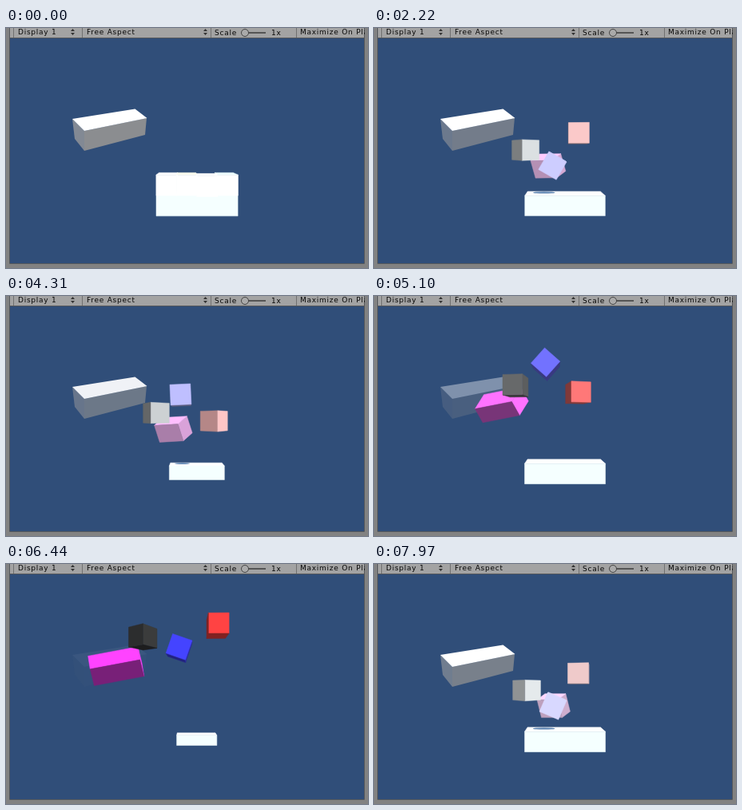
An HTML page with a canvas that plays this animation: 453 by 301 pixels, repeating every 8 s.

```html
<!DOCTYPE html>
<html>
<head>
<meta charset="utf-8">
<style>
html, body { margin: 0; width: 100%; height: 100%; overflow: hidden; background: #304e79; }
canvas, svg { position: absolute; left: 0; top: 0; }
text { font: 9px "DejaVu Sans", sans-serif; letter-spacing: .75px; fill: #080808; }
</style>
</head>
<body>
<canvas width="453" height="301"></canvas>
<svg width="453" height="301">
  <path d="M0 0H453V301H0ZM5 13V295H448V13Z" fill="#828282" fill-rule="evenodd"/>
  <rect x="4" width="445" height="12" fill="#a3a3a3"/>
  <path d="M4.500 0V295.500H448.500V0M4 12.500H449" fill="none" stroke="#55585c"/>
  <path d="M9.500 0V12M95.500 0V12M256.500 0V12M363.500 0V12" stroke="#707070"/>
  <path d="M81 4l2.500-3 2.500 3zM81 6l2.500 3 2.500-3zM247 4l2.500-3 2.500 3zM247 6l2.500 3 2.500-3z" fill="#333"/>
  <path d="M298 6H325" stroke="#555" stroke-width="2"/>
  <circle cx="299" cy="6" r="4.500" fill="#aaa" stroke="#444"/>
  <text x="15" y="8">Display 1</text>
  <text x="101" y="8">Free Aspect</text>
  <text x="261" y="9">Scale</text>
  <text x="332" y="9">1x</text>
  <svg width="449" height="12"><text x="368" y="8">Maximize On Play</text></svg>
</svg>
<script>
const ctx = document.querySelector('canvas').getContext('2d');
const LOOP = 8000, HOLD = 320, CYCLE = 5630;
const EYE = 245, VX = 226, VY = 154, UNIT = 24.5;

// Each face: corners (bits: 1 = right, 2 = bottom, 4 = back) and normal
const FACES = {
  back: [[5, 4, 6, 7], [0, 0, 1]], bottom: [[2, 3, 7, 6], [0, 1, 0]],
  left: [[4, 0, 2, 6], [-1, 0, 0]], right: [[1, 5, 7, 3], [1, 0, 0]],
  top: [[4, 5, 1, 0], [0, -1, 0]], front: [[0, 1, 3, 2], [0, 0, -1]]
};

// Each cube runs along a curve and back: start, bend, end, time of its peak, turn in degrees
const GRAY = { path: [[202, 195], [184, 134.5], [166, 74]], peak: 6010, turn: -145, axis: 'y' };
const BLUE = { path: [[226, 195], [219.5, 135], [213, 63]], peak: 5570, turn: 158, axis: 'z' };
const RED = { path: [[275, 195], [240, 122], [266, 75]], peak: 6350, turn: 185, axis: 'y' };

// Right, down and forward edges of the pink box, at even steps of its way
const POSES = [
  [26, 0, 0, 26, 1, 3], [26, 0, 6, 22, -11, 8],
  [45, -9, 10, 17, -12, 18], [77, -14, 1, 24, 15, 15]];

const clamp = v => Math.max(0, Math.min(1, v));
const mix = (a, b, s) => a + (b - a) * s;
const smooth = s => s * s * (3 - 2 * s);
const rgb = (c, k = 1) => `rgb(${c.map(v => Math.round(255 * clamp(v * k)))})`;

// Linear ping-pong, 1 at the peak
function pingPong(t, peak) {
  if (t < HOLD) return 0;
  const d = (t - peak + 2 * CYCLE) % CYCLE;
  return Math.abs(1 - 2 * d / CYCLE);
}

const curve = ([a, b, c], s) =>
  a.map((v, i) => mix(mix(v, b[i], s), mix(b[i], c[i], s), s));

function poly(points, fill, edge) {
  ctx.beginPath();
  points.forEach(p => ctx.lineTo(p[0], p[1]));
  ctx.closePath();
  ctx.fillStyle = ctx.strokeStyle = fill;
  ctx.fill();
  if (edge) ctx.stroke();
}

function solid(corner, paint) {
  ctx.lineWidth = .5;
  const p = [...Array(8).keys()].map(i =>
    corner(i & 1 ? .5 : -.5, i & 2 ? .5 : -.5, i & 4 ? .5 : -.5));
  for (const name in FACES) {
    const [a, b, c, d] = FACES[name][0].map(i => p[i]);
    const area = (c[0] - a[0]) * (d[1] - b[1]) - (c[1] - a[1]) * (d[0] - b[0]);
    if (area > 0) poly([a, b, c, d], paint(name), true);
  }
}

function project(x, y, z) {
  const k = EYE / (EYE + z);
  return [VX + (x - VX) * k, VY + (y - VY) * k];
}

function cube(item, t, color) {
  const s = pingPong(t, item.peak), [x, y] = curve(item.path, s);
  const angle = item.turn * s * Math.PI / 180, cos = Math.cos(angle), sin = Math.sin(angle);
  const turn = (a, b, d) => item.axis == 'y'
    ? [a * cos - d * sin, b, a * sin + d * cos]
    : [a * cos - b * sin, a * sin + b * cos, d];
  solid((a, b, d) => {
    const v = turn(a, b, d).map(n => n * UNIT);
    return project(x + v[0], y + v[1], v[2]);
  }, name => {
    const n = turn(...FACES[name][1]);
    return rgb(color, .5 + .72 * Math.max(0, .4 * n[0] - .6 * n[1] - .7 * n[2]));
  });
}

function pinkBox(q, color) {
  const i = Math.min(2, Math.floor(q * 3));
  const [ux, uy, vx, vy, wx, wy] = POSES[i].map((v, n) => mix(v, POSES[i + 1][n], q * 3 - i));
  const x = mix(251.5, 130, smooth(q)), y = mix(197, 128, smooth(clamp(q * 1.15)));
  const k = clamp(q * 1.6);
  const shade = { top: 1, front: 1 - .53 * k, left: 1 - .35 * k, right: mix(.75, 1, k * k), bottom: .5, back: .5 };
  solid((a, b, d) => [x + ux * a + vx * b - wx * d, y + uy * a + vy * b - wy * d],
    name => rgb(color, shade[name]));
}

function ghost(q) {
  const a = clamp(1.22 - 1.4 * q);
  poly([[83, 114], [98, 129], [98, 154], [86, 139]], `rgba(130,137,148,${a})`);
  poly([[98, 129], [176, 113], [174, 134], [98, 154]], `rgba(139,141,144,${a})`);
  poly([[83, 114], [161.5, 101.5], [176.5, 113], [98, 129]], `rgba(255,255,255,${clamp(a * 1.4)})`);
}

function base(scale, q) {
  const u = UNIT * scale, dark = clamp(1 - q / .15);
  solid((a, b, d) => project(238.4 + a * u * 3.96, 219.5 + b * u, d * u),
    name => name == 'top' ? rgb([1 - .5 * dark, 1 - .42 * dark, 1 - .23 * dark]) : '#f5ffff');
  if (q > .15 && q < .4) {
    const [x, y] = project(238.4 - 26 * scale, 219.5 - u / 2, 0);
    ctx.beginPath();
    ctx.ellipse(x, y - 1, 14 * scale, 1.2 * scale, 0, 0, 7);
    ctx.fillStyle = '#5b82b0';
    ctx.fill();
  }
}

function draw(t) {
  const q = pingPong(t, 6010);
  const scale = t < HOLD ? 1 : .745 - .245 * Math.cos((t - 900) / CYCLE * 4 * Math.PI);
  const low = 1.17 - 1.07 * q, dim = 1.2 - 1.15 * q;
  ctx.fillStyle = '#304e79';
  ctx.fillRect(0, 0, 453, 301);
  ghost(q);
  base(scale, q);
  cube(RED, t, [1, low, low]);
  pinkBox(q, [1, low, 1]);
  cube(GRAY, t, [dim, dim * 1.02, dim * 1.03]);
  cube(BLUE, t, [low, low, 1]);
}

function tick() {
  draw(performance.now() % LOOP);
  requestAnimationFrame(tick);
}
tick();
</script>
</body>
</html>
```
